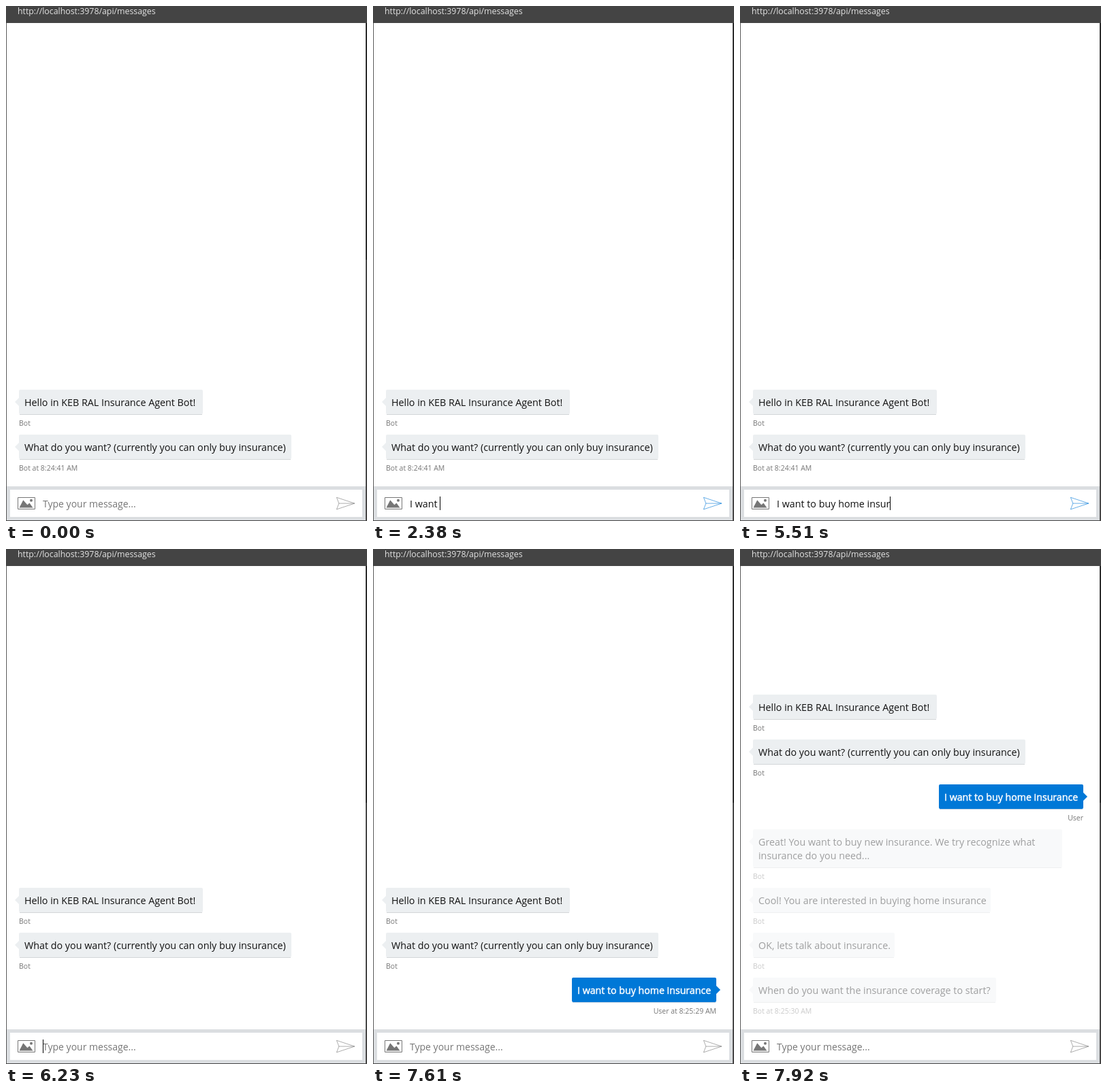
Recreate the animation shown at these times as an HTML page with a canvas. Size 530x757 px, loop 7.99 s.

```html
<!DOCTYPE html>
<html lang="en">
<head>
<meta charset="utf-8">
<title>Chat</title>
<style>
  html, body { margin: 0; width: 100%; height: 100%; overflow: hidden; background: #fff; }
  canvas { display: block; }
</style>
</head>
<body>
<canvas id="stage" width="530" height="757"></canvas>
<script>
const ctx = document.getElementById('stage').getContext('2d');
const LOOP = 7990;
const SENT = 6230, REPLIED = 7840;
const FADE = 320;
const GRAY = '#767676', BLUE = '#0078d7', INK = '#111';
const PHRASE = 'I want to buy home insurance';

// Bursts of typing: first key time, last key time, number of keys
const BURSTS = [
  [1640, 2380, 7], [2620, 3250, 6], [3550, 3550, 1], [3950, 4340, 5],
  [4800, 4800, 1], [5200, 5510, 4], [5680, 5980, 4]
];
const KEYS = BURSTS.flatMap(([from, to, n]) =>
  Array.from({ length: n }, (_, i) => n > 1 ? from + (to - from) * i / (n - 1) : from));

// Caret visible spans while the field is empty
const CARET = [[460, 990], [1520, 1640], [SENT, 6690], [7150, 7610]];

const hello = { lines: ['Hello in KEB RAL Insurance Agent Bot!'], w: 270, from: -FADE };
const ask = { lines: ['What do you want? (currently you can only buy insurance)'], w: 400, from: -FADE, stamp: '8:24:41 AM' };
const order = { lines: [PHRASE], w: 212, from: SENT, stamp: '8:25:29 AM', mine: true };
const replies = [
  { lines: ['Great! You want to buy new insurance. We try recognize what', 'insurance do you need...'], w: 454 },
  { lines: ['Cool! You are interested in buying home insurance'], w: 349 },
  { lines: ['OK, lets talk about insurance.'], w: 208 },
  { lines: ['When do you want the insurance coverage to start?'], w: 357, stamp: '8:25:30 AM' }
].map(m => ({ ...m, from: REPLIED }));
const MESSAGES = [hello, ask, order, ...replies];

function rect(x, y, w, h, color) {
  ctx.fillStyle = color;
  ctx.fillRect(x, y, w, h);
}

function setFont(size) {
  ctx.font = `${size}px "Open Sans", "Noto Sans", sans-serif`;
}

function text(str, x, y, size, color, align = 'left') {
  setFont(size);
  ctx.textAlign = align;
  ctx.fillStyle = color;
  ctx.fillText(str, x, y);
}

function poly(points) {
  ctx.beginPath();
  points.forEach(([x, y]) => ctx.lineTo(x, y));
  ctx.closePath();
}

// Cubic Bezier easing (.25, .1, .25, 1), solved for x by bisection
function ease(x) {
  if (x <= 0) return 0;
  if (x >= 1) return 1;
  const curve = (a, b, s) => 3 * a * s * (1 - s) ** 2 + 3 * b * s * s * (1 - s) + s ** 3;
  let lo = 0, hi = 1;
  for (let i = 0; i < 20; i++) {
    const mid = (lo + hi) / 2;
    if (curve(.25, .25, mid) < x) lo = mid; else hi = mid;
  }
  return curve(.1, 1, lo);
}

// Fades advance in screen steps of about 77 ms
function opacity(t, from) {
  const step = Math.floor((t - from + 4) / 77);
  return ease(step * 77 / FADE);
}

function drawBubble(m, x, y, h, edge) {
  const fill = m.mine ? BLUE : '#eceff1';
  const tip = edge + (m.mine ? 6 : -6);
  rect(x + 1, y + h, m.w - 2, 1, m.mine ? '#c3d3e2' : '#d3d6d8');
  ctx.beginPath();
  ctx.roundRect(x, y, m.w, h, 2);
  ctx.fillStyle = fill;
  ctx.fill();
  poly([[edge, y + 12], [tip, y + 18], [edge, y + 24]]);
  ctx.fill();
}

function drawMessage(m, y, t, isLast) {
  const h = 16 + 20 * m.lines.length;
  const x = m.mine ? 504 - m.w : 19;
  const edge = m.mine ? 504 : 19;
  ctx.globalAlpha = opacity(t, m.from);
  drawBubble(m, x, y, h, edge);
  m.lines.forEach((line, i) => {
    const base = y + 24 + 20 * i;
    text(line, x + 8, base, m.mine ? 14.2 : 14.3, m.mine ? '#fff' : INK);
    if (m.mine) {
      // A hairline outline gives the white text its medium weight
      ctx.strokeStyle = '#fff';
      ctx.lineWidth = .45;
      ctx.strokeText(line, x + 8, base);
    }
  });
  const label = (m.mine ? 'User' : 'Bot') + (isLast ? ' at ' + m.stamp : '');
  text(label, edge, y + h + 17, 10.5, GRAY, m.mine ? 'right' : 'left');
  ctx.globalAlpha = 1;
}

function drawMessages(t) {
  const shown = MESSAGES.filter(m => t >= m.from);
  let bottom = 696;
  for (let i = shown.length - 1; i >= 0; i--) {
    const y = bottom - 46 - 20 * shown[i].lines.length;
    drawMessage(shown[i], y, t, i === shown.length - 1);
    bottom = y;
  }
}

function drawPictureIcon() {
  ctx.strokeStyle = ctx.fillStyle = GRAY;
  ctx.lineWidth = 1;
  ctx.strokeRect(17.5, 722.5, 25, 17);
  poly([[19.5, 737.5], [25.3, 726.2], [31.4, 733.2], [34.5, 730.6], [39.5, 737.5]]);
  ctx.fill();
  ctx.beginPath();
  ctx.arc(37, 726.8, 2, 0, 7);
  ctx.fill();
}

function drawSendIcon(color) {
  ctx.strokeStyle = color;
  ctx.lineWidth = .6;
  ctx.lineJoin = 'round';
  poly([[485.4, 722.3], [511.8, 731.1], [485.4, 739.9], [488.8, 731.1]]);
  ctx.moveTo(488.8, 731.1);
  ctx.lineTo(511.8, 731.1);
  ctx.stroke();
}

function drawInput(t) {
  rect(1, 706, 527, 50, '#dbdee1');
  rect(6, 711, 517, 40, '#fff');
  drawPictureIcon();
  const count = t < SENT ? KEYS.filter(k => t >= k - .5).length : 0;
  const typed = PHRASE.slice(0, count);
  if (count) text(typed, 54, 737, 14.3, INK);
  else text('Type your message...', 54, 737, 14, GRAY);
  drawSendIcon(count ? BLUE : GRAY);
  if (count || CARET.some(([a, b]) => t >= a && t < b)) {
    setFont(14.3);
    rect(54 + Math.round(ctx.measureText(typed).width), 721, 1, 20, '#000');
  }
}

function draw(t) {
  rect(0, 0, 530, 757, '#fff');
  drawMessages(t);
  drawInput(t);
  rect(0, 0, 530, 25, '#444');
  text('http://localhost:3978/api/messages', 17, 12, 12.35, '#e4e4e4');
  rect(0, 25, 1, 732, '#5a5a5a');
  rect(528, 25, 2, 348, '#2d2d2d');
  rect(528, 373, 2, 384, '#484848');
  rect(0, 756, 530, 1, '#484848');
}

const start = performance.now();
function tick() {
  draw((performance.now() - start) % LOOP);
  requestAnimationFrame(tick);
}
tick();
</script>
</body>
</html>
```
